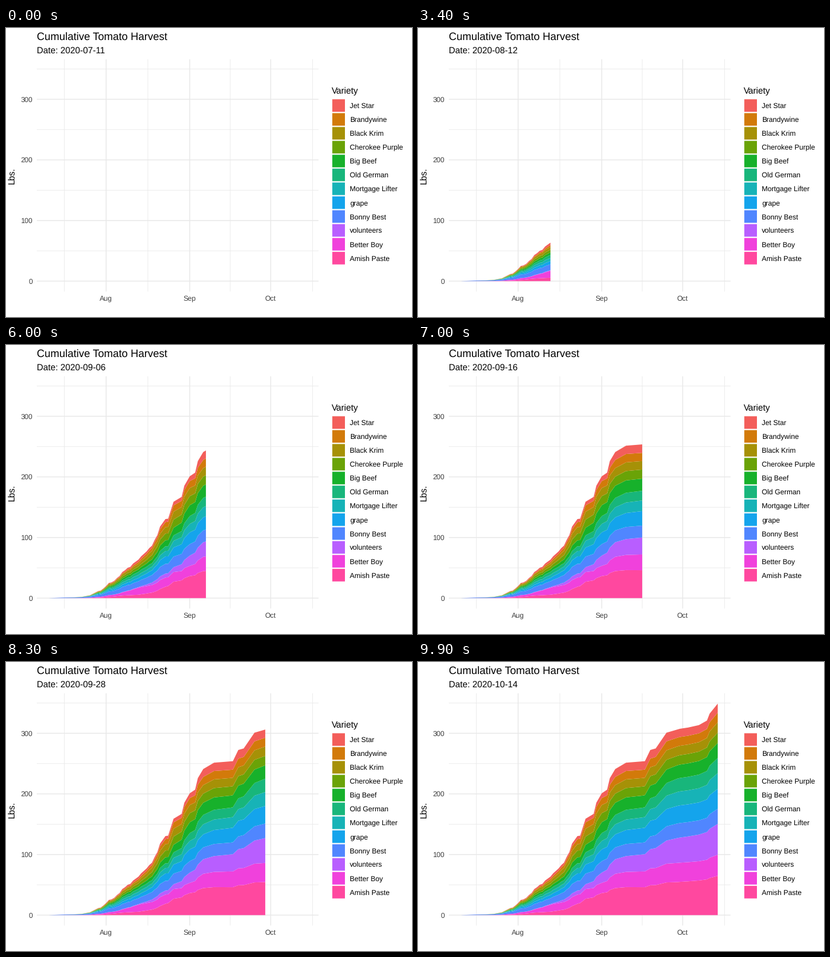
Animation, 672 px wide and 480 px high, one loop 10000 ms. Source, as a matplotlib script:

```python
import matplotlib.pyplot as plt
import numpy as np
from matplotlib.animation import FuncAnimation
from matplotlib.patches import Polygon, Rectangle

plt.rcParams["font.family"] = "Liberation Sans"
plt.rcParams["text.hinting"] = "none"

W, H, DPI = 672, 480, 96
FRAMES, LAST_DAY = 100, 95
START = np.datetime64("2020-07-11")
LEFT, RIGHT, TOP, BOTTOM = 51, 517.3, 52, 437.6
GRID, TICK = "#E8E8E8", "#404040"

# Total pounds picked by day since START, straight lines in between.
TOTAL = [
    (0, .1), (5, .9), (9, 1.3), (12, 2), (13, 3), (15, 4.6), (17, 9.2),
    (18, 11.5), (19, 12.5), (20, 16), (21, 20), (22, 25), (23, 26),
    (24, 28.5), (25, 33), (26, 36.5), (27, 43), (28, 46), (29, 50),
    (30, 51.5), (31, 57), (33, 63.5), (34, 69), (36, 77), (37, 82.5),
    (38, 86.5), (39, 96), (40, 104), (41, 118), (43, 130.5), (44, 131),
    (46, 159), (49, 167), (50, 185.5), (52, 201), (54, 207), (55, 226),
    (57, 241), (61, 251.5), (68, 254), (70, 272.5), (72, 275), (76, 301),
    (81, 307.5), (84, 309.5), (88, 313.5), (91, 321), (92, 332.5), (95, 349),
]

# Pounds of each variety on a few days, from the top of the stack down.
KEY_DAYS = [5, 17, 25, 33, 39, 46, 52, 57, 67, 80, 95]
VARIETIES = [
    ("Jet Star", "#F35E5A", [0, .3, 1.5, 4, 4, 6, 8, 13, 14, 13.5, 15]),
    ("Brandywine", "#D27A0A", [0, .3, 1, 3, 5.5, 10.5, 11.5, 13.5, 13.5, 14.5, 16]),
    ("Black Krim", "#A69107", [0, .6, 2.7, 4.5, 8, 13, 13.5, 14, 14, 15.5, 17]),
    ("Cherokee Purple", "#6AA307", [0, .6, 2.7, 4.5, 8, 13.5, 15, 15, 15, 15.5, 17]),
    ("Big Beef", "#17B12B", [0, .6, 2.5, 4, 7, 12.5, 18, 20, 20, 22, 25]),
    ("Old German", "#18B67B", [0, .9, 2.6, 5, 6, 9, 13, 15.5, 16, 22, 25]),
    ("Mortgage Lifter", "#17B3B7", [0, .9, 3, 5, 6.5, 11, 14, 16.5, 17.5, 23, 26]),
    ("grape", "#14A4EC", [0, .8, 3, 5.5, 9, 15, 19.5, 21.5, 24, 29, 33]),
    ("Bonny Best", "#5086FF", [.9, 2.6, 7, 9.5, 13.5, 17.5, 19, 19.5, 19.5, 24, 25]),
    ("volunteers", "#B85EFF", [0, 0, .2, 1, 5, 8, 17, 24, 28, 41, 51]),
    ("Better Boy", "#F041DC", [.1, 1.2, 3.5, 11.5, 13, 16, 17, 23.5, 26, 31.5, 35]),
    ("Amish Paste", "#FF489F", [0, .5, 3.3, 5.5, 10.5, 27, 36.5, 44.5, 46, 54.5, 65]),
]


def px(day):
    return 71.9 + 4.4655 * day


def py(lbs):
    return 420.4 - 1.0066 * lbs


def stack_edges():
    """Pixel heights of the layer edges for each day, baseline first."""
    days = np.arange(LAST_DAY + 1)
    total = np.interp(days, *zip(*TOTAL))
    lbs = np.array([v[2] for v in reversed(VARIETIES)], float)
    share = lbs / lbs.sum(axis=0)
    layers = [np.interp(days, KEY_DAYS, row) * total for row in share]
    return px(days), py(np.vstack([0 * total, np.cumsum(layers, axis=0)]))


fig = plt.figure(figsize=(W / DPI, H / DPI), dpi=DPI, facecolor="white")
ax = fig.add_axes([0, 0, 1, 1])
ax.set(xlim=(0, W), ylim=(H, 0))
ax.axis("off")


def label(x, y, text, size, color="black", **kw):
    kw.setdefault("va", "baseline")
    return ax.text(x, y, text, fontsize=size, color=color, **kw)


def grid(xs, ys, width):
    style = dict(color=GRID, lw=width * 72 / DPI, solid_capstyle="butt", snap=False)
    for x in xs:
        ax.plot([x, x], [TOP, BOTTOM], zorder=1, **style)
    for y in ys:
        ax.plot([LEFT, RIGHT], [y, y], zorder=1, **style)


months = {"Aug": 21, "Sep": 52, "Oct": 82}
ticks = [0, 100, 200, 300]
grid([px(d) for d in (5.5, 36.5, 67, 97.5)], [py(v + 50) for v in ticks], .8)
grid([px(d) for d in months.values()], [py(v) for v in ticks], 1.4)

for name, day in months.items():
    label(px(day), 453, name, 8.8, TICK, ha="center")
for v in ticks:
    label(44, py(v) + 4.2, str(v), 8.8, TICK, ha="right")

label(50.7, 20, "Cumulative Tomato Harvest", 13.2)
date = label(50.7, 42, "", 11)
label(18, 245, "Lbs.", 11, rotation=90, ha="right", va="center")

label(538.7, 109, "Variety", 11)
for i, (name, color, _) in enumerate(VARIETIES):
    mid = 128.8 + 23.04 * i
    ax.add_patch(Rectangle((540.1, mid - 10.45), 20.9, 20.9, fc=color, lw=0, snap=False))
    label(569.2, mid + 4.2, name, 8.8)

X, EDGES = stack_edges()
areas = [
    ax.add_patch(Polygon(np.zeros((3, 2)), fc=v[1], lw=0, zorder=2, snap=False))
    for v in reversed(VARIETIES)
]


def update(i):
    day = i * LAST_DAY / (FRAMES - 1)
    n = int(round(day)) + 1
    xs = np.r_[X[:n], X[:n][::-1]]
    for k, area in enumerate(areas):
        ys = np.r_[EDGES[k, :n], EDGES[k + 1, :n][::-1]]
        area.set_xy(np.c_[xs, ys])
        area.set_visible(n > 1)
    date.set_text(f"Date: {START + int(day)}")
    return [*areas, date]


anim = FuncAnimation(fig, update, frames=FRAMES, interval=100, repeat=True, repeat_delay=0)
plt.show()
```
